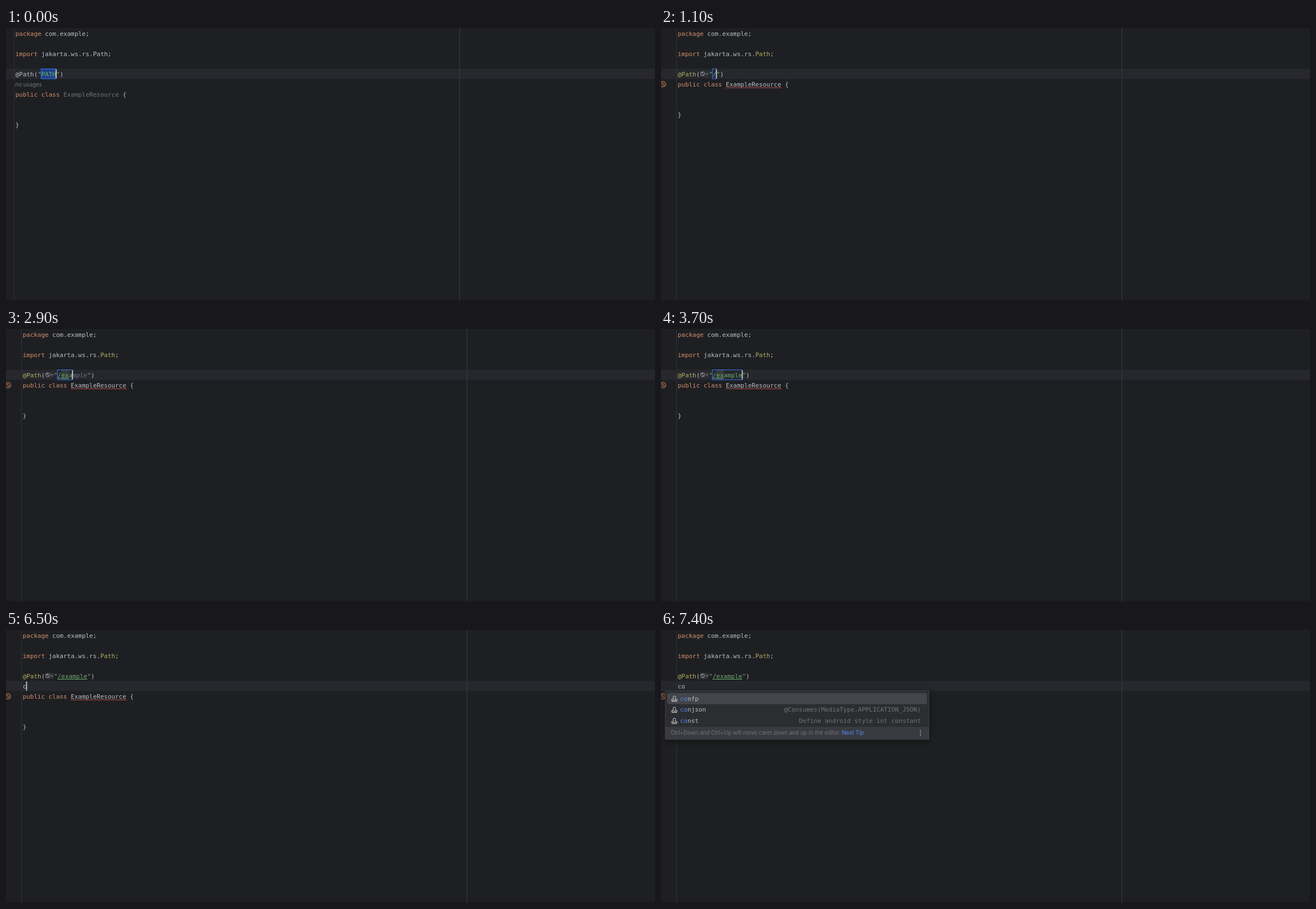
Animation, 1154 px wide and 485 px high, one loop 8000 ms. Source, as an HTML page:

```html
<!DOCTYPE html>
<html lang="en">
<head>
<meta charset="utf-8">
<title>Editor</title>
<style>
  html, body { margin: 0; width: 100%; height: 100%; overflow: hidden; background: #1e1f22; }
  svg { display: block; width: 1154px; height: 485px; }
  text { font: 10.92px "DejaVu Sans Mono", monospace; white-space: pre; }
  text.ui { font: 9.75px Inter, sans-serif; }
  .bold { font-weight: bold; }
  .ghost { font-style: italic; }
  .popup { filter: drop-shadow(0 3px 6px rgba(0, 0, 0, .45)); }
</style>
</head>
<body>
<svg id="stage" viewBox="0 0 1154 485"></svg>
<script>
const LOOP = 8000, CHAR = 6.572, ROW = 18;
const C = {
  text: '#bcbec4', keyword: '#cf8e6d', note: '#b3ae60', string: '#6aab73',
  dim: '#6f737a', link: '#548af7', blue: '#3574f0', caret: '#ced0d6'
};

// Each beat changes some of the state and keeps the rest.
const beats = [
  [0, { left: 16.8, usages: true, path: 'PATH', selected: true, box: true, caret: true }],
  [300, { resolved: true }],
  [400, { left: 29.8, usages: false, gutter: true }],
  [500, { inlay: true, error: true }],
  [1100, { path: '/', selected: false }],
  [1400, { path: '/e' }],
  [1500, { path: '/ex' }],
  [1600, { ghost: 'ample', mark: true }],
  [1900, { link: 3 }],
  [2900, { path: '/exa', ghost: 'mple' }],
  [3000, { path: '/exam', ghost: 'ple' }],
  [3200, { path: '/examp', ghost: 'le' }],
  [3500, { path: '/exampl', ghost: 'e' }],
  [3700, { path: '/example', ghost: '' }],
  [4000, { link: 8 }],
  [4800, { box: false, mark: false, atEnd: true }],
  [4900, { parens: true }],
  [5500, { parens: false, line: '' }],
  [6400, { line: 'c' }],
  [6600, { line: 'co', match: 1, list: ['class', 'cliqpar', 'confp', 'csjson', 'conjson', 'const'] }],
  [6700, { match: 2, list: ['confp', 'conjson', 'const'] }],
  [7400, { caret: false }]
];
const states = [];
for (const [at, change] of beats) states.push({ ...states[states.length - 1], ...change, at });

const hints = {
  conjson: '@Consumes(MediaType.APPLICATION_JSON)',
  const: 'Define android style int constant'
};

const rect = (x, y, w, h, fill, more = '') =>
  `<rect x="${x}" y="${y}" width="${w}" height="${h}" fill="${fill}" ${more}/>`;
const path = (d, stroke, width = 1, fill = 'none') =>
  `<path d="${d}" stroke="${stroke}" stroke-width="${width}" fill="${fill}"/>`;
const label = (x, y, str, fill, more = '') =>
  `<text x="${x}" y="${y}" fill="${fill}" ${more}>${str}</text>`;
const rowTop = row => row * ROW + .5;

// Lays out [text, colour, class] pieces one after another.
function code(x, row, ...parts) {
  let out = '';
  for (const [str, fill = C.text, cls = ''] of parts) {
    out += label(x, row * ROW + 13.5, str, fill, `class="${cls}"`);
    x += str.length * CHAR;
  }
  return out;
}

function globe(x) {
  return rect(x + .3, 76, 15.4, 11, '#2f3136', 'rx="2"') +
    `<circle cx="${x + 4.7}" cy="81.3" r="3.6" fill="#34373c" stroke="#868a91"/>` +
    path(`M${x + 1.8} 79.5l3 -1.6 1 1.6 -2 1.4zM${x + 4.5} 82.2l3 .3 -1.8 2z`, 'none', 0, '#868a91') +
    path(`M${x + 10} 80.2l2.4 2.4 2.4 -2.4`, '#9da0a8');
}

function noEntry(y) {
  return `<circle cx="3.5" cy="${y}" r="5" fill="#45322b" stroke="#c77d55"/>` +
    path(`M0 ${y - 3.5}l7 7`, '#c77d55');
}

function squiggle(x, y, length) {
  let d = `M${x} ${y}`;
  for (let i = 0; i < length / 1.65; i++) d += `l1.65 ${i % 2 ? 1.8 : -1.8}`;
  return path(d, '#db5c5c', .9);
}

function stamp(y) {
  return path(`M22.4 ${y + 1}c0 -1.5 -1 -2 -1 -3.3a2.4 2.2 0 0 1 4.8 0c0 1.3 -1 1.8 -1 3.3` +
    `h2.5q1 0 1 1v1.2h-9.8v-1.2q0 -1 1 -1zM18.8 ${y + 5}h10`, C.caret);
}

function popup({ list, match }) {
  const top = 112, step = 19.7, foot = top + step * list.length + 1, end = foot + 22;
  let out = rect(7.5, 108, 469, end - 108, '#2b2d30', 'class="popup"') +
    rect(7.5, foot, 469, 22, '#393b40') +
    rect(7.5, 108, 469, end - 108, 'none', 'stroke="#43454a" stroke-width=".9"') +
    rect(11, top, 462, step, '#43454a', 'rx="3"');
  list.forEach((word, i) => {
    const mid = top + step * (i + .5), base = mid + 3.9;
    const cls = word === 'class' ? 'class="bold"' : '';
    if (!cls) out += stamp(mid);
    out += label(34, base, word.slice(0, match), C.link, cls) +
      label(34 + match * CHAR, base, word.slice(match), C.text, cls);
    if (hints[word]) out += label(462, base, hints[word], C.dim, 'text-anchor="end"');
  });
  const base = foot + 14;
  out += label(17, base, 'Ctrl+Down and Ctrl+Up will move caret down and up in the editor', C.dim, 'class="ui"') +
    label(321.5, base, 'Next Tip', C.link, 'class="ui"');
  for (const dy of [-4, 0, 4]) out += `<circle cx="461.3" cy="${foot + 10.7 + dy}" r=".9" fill="${C.caret}"/>`;
  return out;
}

function draw(s) {
  const x = s.left, typing = s.line !== undefined;
  const classRow = s.usages || typing ? 6 : 5;
  const caretRow = typing ? 5 : 4, top = rowTop(4);
  const note = s.resolved ? C.note : C.text;
  const open = x + 5 * CHAR;
  const quote = open + CHAR + (s.inlay ? 16 : 0);
  const start = quote + CHAR;
  const typed = s.path.length * CHAR;
  const close = start + typed + (s.ghost || '').length * CHAR + CHAR;
  const nameX = x + 13 * CHAR;

  let out = rect(0, rowTop(caretRow), 1154, ROW, '#26282e') +
    rect(x - 2.6, 0, 1, 485, '#313438') +
    rect(x + 789.2, 0, 1, 485, '#393b40');

  if (s.parens) out += rect(open, top, CHAR, ROW, '#43454a') + rect(close, top, CHAR, ROW, '#43454a');
  if (s.mark) out += rect(start + CHAR, top, 2 * CHAR, ROW, '#373b39');
  if (s.box) out += rect(start - .4, top, typed + .4, ROW - .3, s.selected ? '#214283' : 'none', `stroke="${C.blue}"`);
  if (s.inlay) out += globe(open + CHAR);

  const paren = s.parens ? 'bold' : '';
  out += code(x, 0, ['package', C.keyword], [' com.example;']) +
    code(x, 2, ['import', C.keyword], [' jakarta.ws.rs.'], ['Path', note], [';']) +
    code(x, 4, ['@Path', note], ['(', C.text, paren]) +
    code(quote, 4, ['"' + s.path, C.string], [s.ghost || '', C.dim, 'ghost'], ['"', C.string], [')', C.text, paren]);
  if (s.link) out += rect(start, 87, s.link * CHAR, 1, C.string);

  if (s.usages) out += label(16.4, 103.6, 'no usages', C.dim, 'class="ui"');
  if (typing) out += code(x, 5, [s.line]);
  out += code(x, classRow, ['public class ', C.keyword], ['ExampleResource', s.error ? C.text : C.dim], [' {']) +
    code(x, classRow + 3, ['}']);
  if (s.error) out += squiggle(nameX, classRow * ROW + 17, 15 * CHAR);
  if (s.gutter) out += noEntry(classRow * ROW + 9.8);

  if (s.caret) {
    const at = typing ? x + s.line.length * CHAR : s.atEnd ? close + CHAR : start + typed;
    out += rect(at - .7, rowTop(caretRow) + 1, 1.7, 16, C.caret);
  }
  if (s.list) out += popup(s);
  return out + rect(0, 483, 1154, 2, '#000', 'opacity=".15"');
}

const stage = document.getElementById('stage');
let shown;
function tick() {
  const t = performance.now() % LOOP;
  const state = states.findLast(s => s.at <= t);
  if (state !== shown) stage.innerHTML = draw(shown = state);
  requestAnimationFrame(tick);
}
tick();
</script>
</body>
</html>
```
